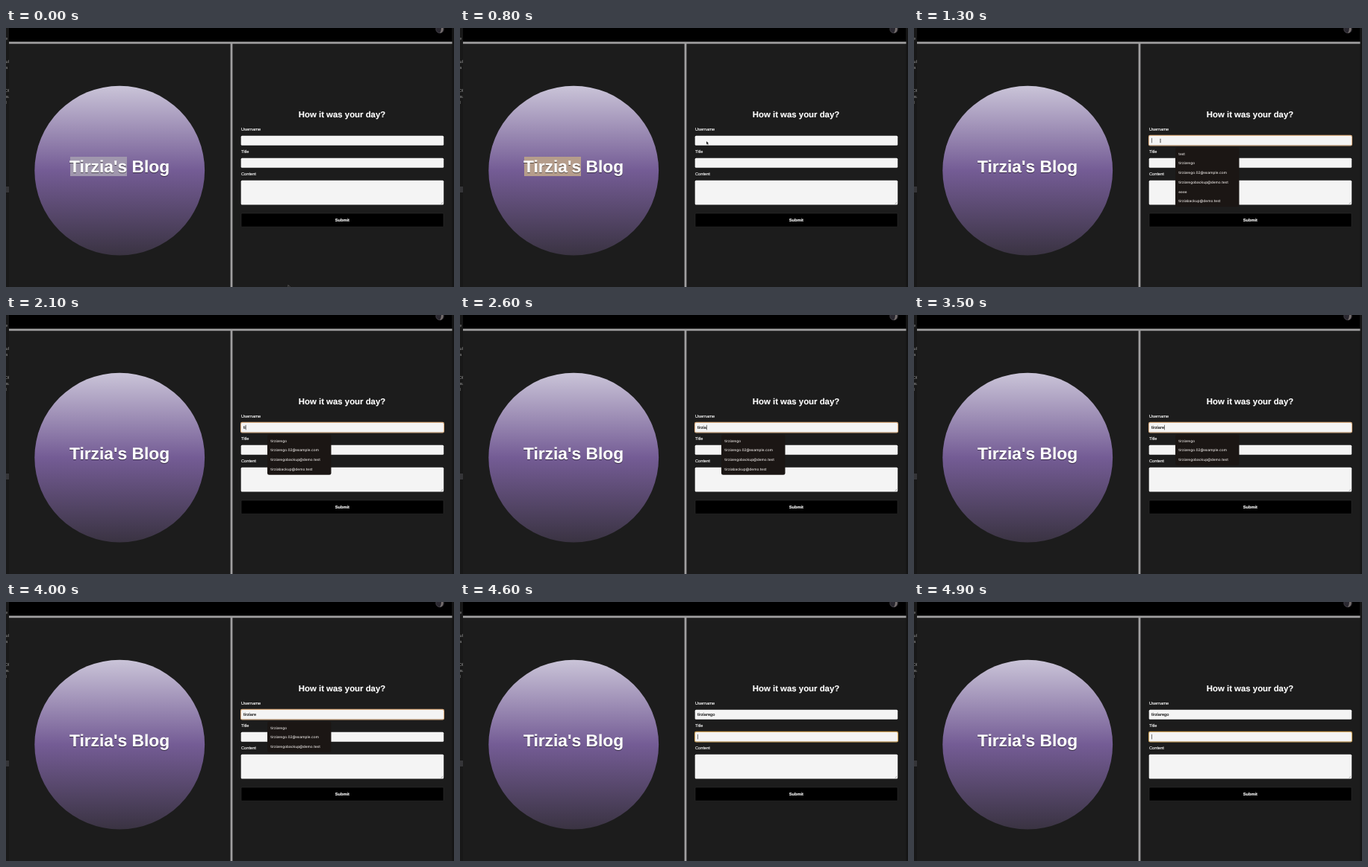
An HTML page for the animation above (5000 ms loop, 600 by 348 pixels).

```html
<!DOCTYPE html>
<html lang="en">
<head>
<meta charset="utf-8">
<title>Blog form</title>
<style>
  html, body { margin: 0; width: 100%; height: 100%; overflow: hidden; background: #1c1c1c; }
  svg { display: block; width: 600px; height: 348px; }
  text {
    font: 5.7px "Liberation Sans", Arial, sans-serif; text-rendering: geometricPrecision;
    fill: #fff; stroke: #fff; stroke-width: .12; white-space: pre;
  }
  .bold { font-weight: bold; text-anchor: middle; }
  .logo { font-size: 22.8px; filter: drop-shadow(.8px 1px .5px #0008); }
  .head { font-size: 11.4px; }
  .back text { fill: #999; stroke: none; }
  .typed { fill: #111; stroke: #111; }
  .field { fill: #f4f4f4; }
  .ring { fill: none; stroke: #dcb083; stroke-width: 1.1; }
  #menu text { font: 500 4.8px Inter, sans-serif; fill: #e9e5e3; stroke: none; }
</style>
</head>
<body>
<svg viewBox="0 0 600 348">
  <defs>
    <linearGradient id="dusk" x2="0" y2="1">
      <stop offset="0" stop-color="#cac4d8"/>
      <stop offset=".5" stop-color="#745c95"/>
      <stop offset="1" stop-color="#3a3342"/>
    </linearGradient>
  </defs>

  <!-- sliver of the window behind -->
  <g class="back">
    <rect width="4" height="348" fill="#181818"/>
    <rect y="213" width="4" height="8" fill="#353538"/>
    <text x="-1" y="16">e</text>
    <text x="-.5" y="46.5">ul</text>
    <text x="-1" y="54.5">a</text>
    <text x="-1.5" y="86">Ol</text>
    <text x="-.5" y="94">su</text>
    <text x="-.5" y="102">l</text>
  </g>

  <rect x="4" width="596" height="348" fill="#1c1c1c"/>
  <rect x="4" width="593.5" height="18.5" fill="#000"/>
  <rect x="597.5" width="2.5" height="348" fill="#141414"/>
  <path d="M4 19.9H597.5M302 20V348" stroke="#a09fa0" stroke-width="2.8"/>
  <circle cx="581" cy="1.5" r="5.3" fill="#2a2830" stroke="#57525a" stroke-width=".6"/>
  <path d="M582-3.5a5.4 5.4 0 0 1-1 10.4a11 11 0 0 0 1-10.4" fill="#77706f"/>

  <circle cx="152.2" cy="191.6" r="113.9" fill="url(#dusk)"/>
  <rect id="mark" x="86" y="173" width="76" height="26"/>
  <text class="bold logo" x="152" y="194">Tirzia's Blog</text>

  <text class="bold head" x="450" y="120">How it was your day?</text>
  <text x="315" y="138">Username</text>
  <text x="315" y="168">Title</text>
  <text x="315" y="198">Content</text>
  <rect class="field" x="314.7" y="144.7" width="271.5" height="13" rx="1.5"/>
  <rect class="field" x="314.7" y="174.7" width="271.5" height="13" rx="1.5"/>
  <rect class="field" x="314.7" y="204.7" width="271.5" height="32.7" rx="1.5"/>
  <path d="M582.5 236.5l2.7-2.7M584 236.5l1.2-1.2" stroke="#888" stroke-width=".5"/>
  <rect x="315" y="249" width="271" height="18.2" rx="1" fill="#000" stroke="#333" stroke-width=".5"/>
  <text class="bold" x="450.3" y="260">Submit</text>

  <rect id="ring" class="ring" x="314.5" width="272" height="13.6" rx="1.8"/>
  <text id="name" class="typed" x="318" y="153.2"></text>
  <rect id="caret" width=".6" height="6.6" fill="#222"/>
  <g id="menu"></g>

  <path id="arrow" d="M0 0V4.6L1.1 3.6L1.9 5.3L2.7 4.9L1.9 3.3H3.3Z" fill="#000" stroke="#ddd" stroke-width=".35"/>
  <path id="beam" d="M329 149q1 0 1 1v3q0 1-1 1M331 149q-1 0-1 1v3q0 1 1 1" fill="none" stroke="#222" stroke-width=".45"/>
</svg>
<script>
const LOOP = 5000, STEP = 100, FOCUS = 1300, NEXT = 4600;
const START = [378, 345.5], END = [330, 152];
const user = "tirziarego";
const keys = [1900, 2000, 2200, 2300, 2400, 2500, 2900, 3100, 4300, 4400];
const saved = ["test", user, user + ".02@example.com", user + "backup@demo.test", "eeee", "tirziabackup@demo.test"];

const $ = id => document.getElementById(id);
const show = (id, on) => $(id).setAttribute("visibility", on ? "visible" : "hidden");
const place = (id, x, y) => { $(id).setAttribute("x", x); $(id).setAttribute("y", y); };

function menu(typed) {
  const rows = saved.filter(s => s.startsWith(typed));
  return `<rect x="350" y="160.6" width="85.5" height="${rows.length * 12.75 + 3.2}" rx="2.4" fill="#1b1614"/>` +
    rows.map((s, i) => `<text x="354.3" y="${170.6 + i * 12.75}">${s}</text>`).join("");
}

function draw(t) {
  const p = Math.min(1, t / 700), ease = p * p * (3 - 2 * p);
  const [x, y] = START.map((a, i) => a + (END[i] - a) * ease);
  $("arrow").setAttribute("transform", `translate(${x} ${y})`);
  show("arrow", t < FOCUS);
  show("beam", t >= FOCUS && t < keys[0]);

  show("mark", t < FOCUS);
  $("mark").setAttribute("fill", t < 700 ? "#a097ad" : "#b59d8b");

  const done = keys.filter(k => k <= t), typed = user.slice(0, done.length);
  const onTitle = t >= NEXT;
  $("name").textContent = typed;
  $("menu").innerHTML = t >= FOCUS && t < 4500 ? menu(typed) : "";

  show("ring", t >= FOCUS);
  $("ring").setAttribute("y", onTitle ? 174.4 : 144.4);
  $("ring").style.stroke = onTitle ? "#d2a65c" : "";

  // the caret restarts its blink at every key or focus
  const last = Math.max(FOCUS, ...done, onTitle ? NEXT : 0);
  show("caret", t >= FOCUS && (t - last) % 1000 < 500);
  const width = typed && !onTitle ? $("name").getComputedTextLength() : 0;
  place("caret", 318 + width, onTitle ? 177.8 : 147.8);
}

const begin = performance.now();
function tick() {
  const t = (performance.now() - begin) % LOOP;
  draw(Math.floor(t / STEP) * STEP);
  requestAnimationFrame(tick);
}
tick();
</script>
</body>
</html>
```
